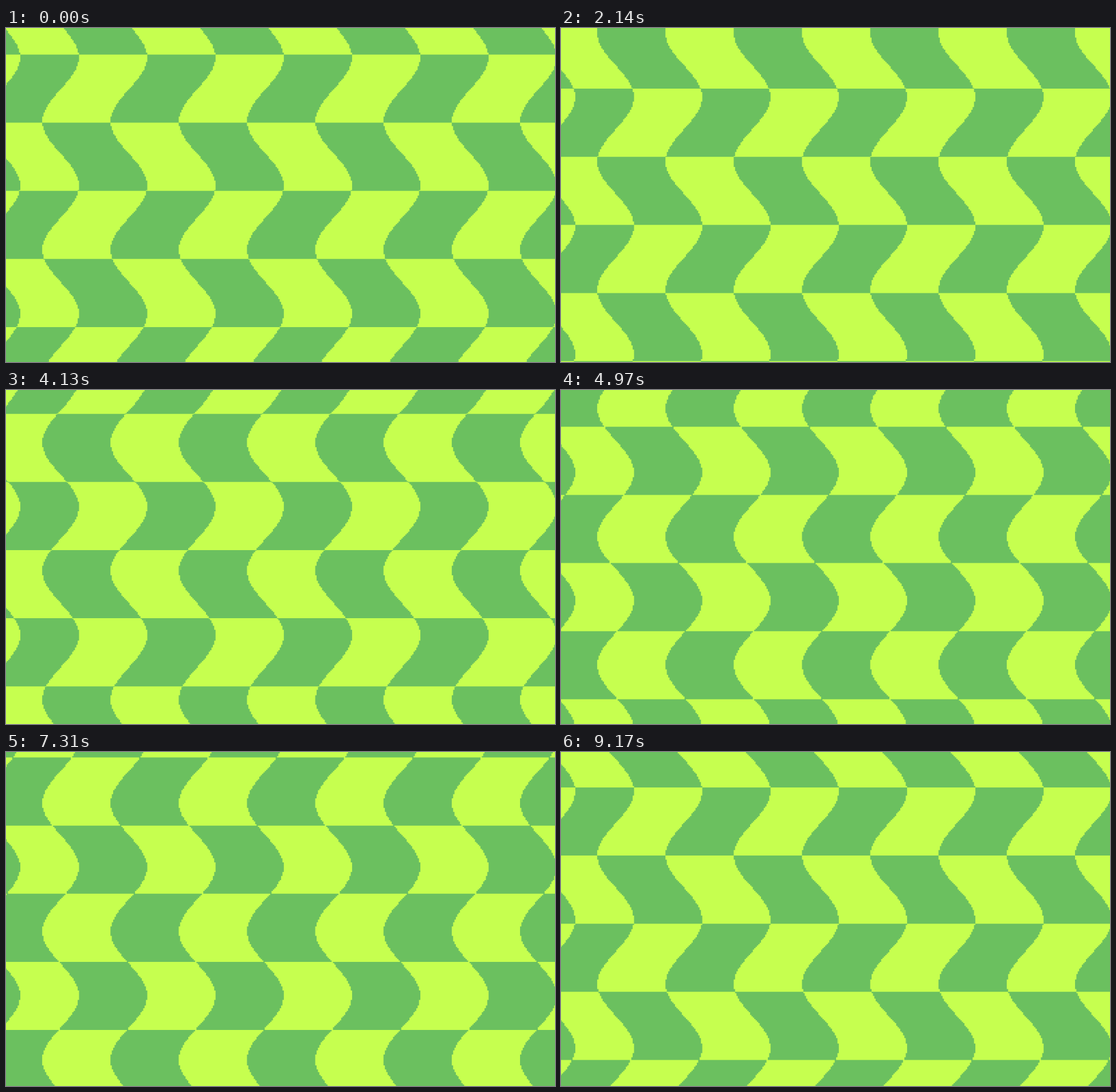
An HTML page with a canvas that plays this animation: 958x584 px, repeating every 9.23 s.

```html
<!DOCTYPE html>
<html lang="en">
<head>
<meta charset="utf-8">
<title>Wavy checkerboard</title>
<style>
  html, body { margin: 0; width: 100%; height: 100%; overflow: hidden; background: #6bc05f; }
  canvas { display: block; width: 100%; height: 100%; }
</style>
</head>
<body>
<canvas id="stage" width="958" height="584"></canvas>
<script>
  const ctx = document.getElementById('stage').getContext('2d');
  const GREEN = '#6bc05f', LIME = '#c6ff4f';
  const LOOP = 9230;
  const SCALE = 1.1912;                  // stage pixels per grid unit
  const ROWS = 491;
  const CELL = 100, FIRST_CELL = 86;     // the leftmost column is narrower

  function stepAt(t) {
    if (t < 40) return 0;
    const late = t >= 4000 ? 10 : 0;
    return 1 + Math.floor((t - 40 - late) / 60);
  }

  // Left edge of column k for a given wave shift.
  const edge = (k, shift) =>
    k >= 0 ? shift + k * CELL : shift - FIRST_CELL + (k + 1) * CELL;

  function draw(step) {
    const scroll = Math.round(38.9 + 1.39 * step);
    ctx.setTransform(1, 0, 0, 1, 0, 0);
    ctx.fillStyle = GREEN;
    ctx.fillRect(0, 0, 958, 584);
    ctx.scale(SCALE, SCALE);
    ctx.fillStyle = LIME;
    // One path, so that neighbouring scanlines join without seams.
    ctx.beginPath();
    for (let y = 0; y < ROWS; y++) {
      const mid = y - y % 2 + 1;         // scanlines are two units tall
      const wave = Math.sin(mid / 30 + 0.12 * step + 0.14);
      const shift = 81 + 2 * Math.floor(13.37 * wave);
      const odd = Math.floor((y - scroll) / CELL) & 1;
      for (let k = odd - 2; k < 9; k += 2) {
        const left = edge(k, shift);
        ctx.rect(left, y, edge(k + 1, shift) - left, 1);
      }
    }
    ctx.fill();
  }

  let start = null, shown = -1;
  function tick(now) {
    if (start === null) start = now;
    const step = stepAt((now - start) % LOOP);
    if (step !== shown) draw(shown = step);
    requestAnimationFrame(tick);
  }
  draw(shown = 0);
  requestAnimationFrame(tick);
</script>
</body>
</html>
```
